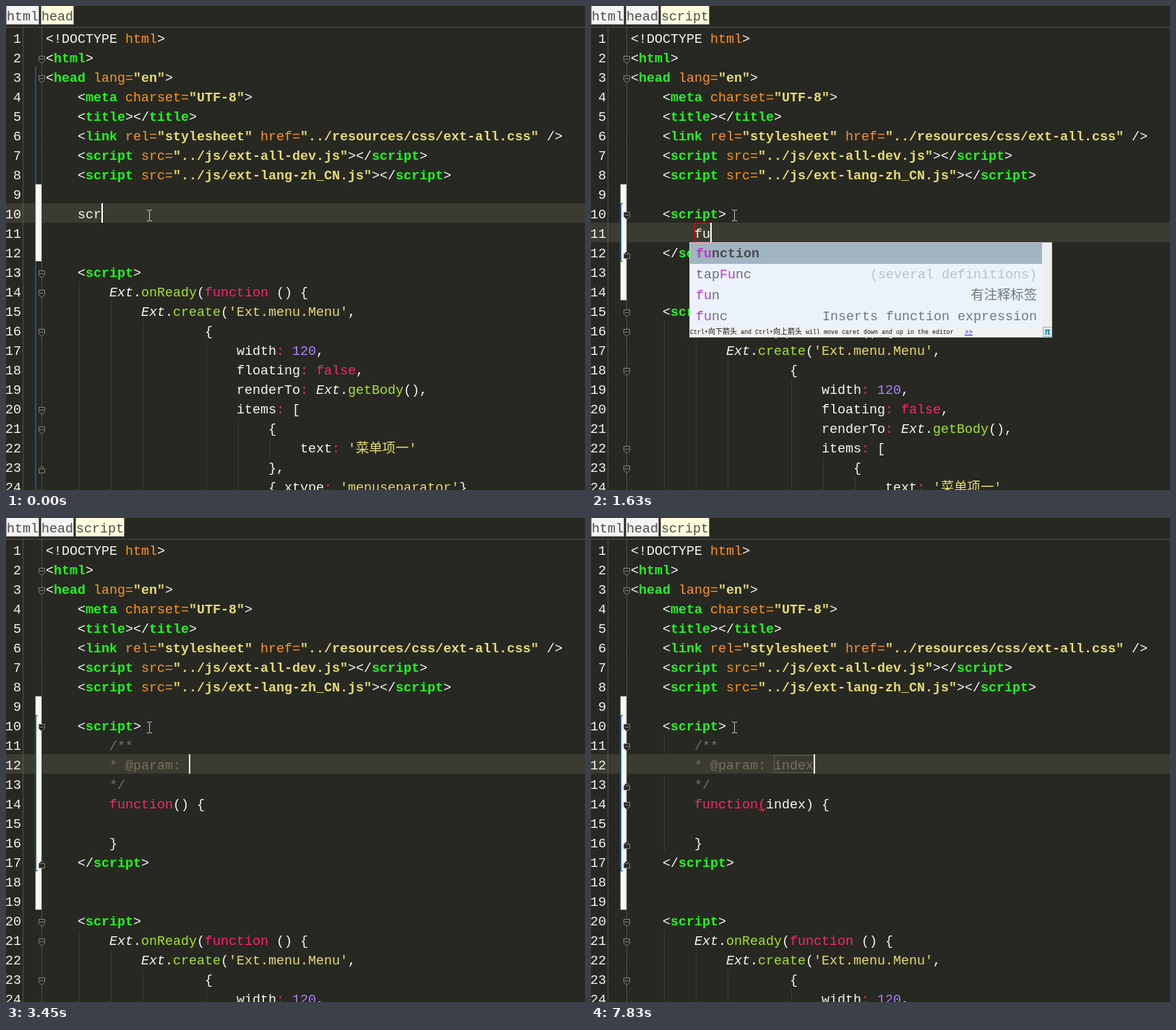
Recreate the animation shown at these times as an HTML page with a canvas. Size 801 by 670 pixels, loop 8000 ms.

```html
<!DOCTYPE html>
<html lang="en">
<head>
<meta charset="UTF-8">
<title>Code editor typing</title>
<style>
  html, body { margin: 0; width: 100%; height: 100%; overflow: hidden; background: #272822; }
  canvas { display: block; }
</style>
</head>
<body>
<canvas id="stage" width="801" height="670"></canvas>
<script>
const ctx = document.getElementById('stage').getContext('2d');
const LOOP = 8000, LEFT = 55, ADVANCE = 11, LINE = 27, TOP = 30, BG = '#272822';
const MONO = '"Liberation Mono", "Noto Sans CJK SC", monospace';
const CODE_FONT = `18.33px ${MONO}`;

// Each run of code starts with one of these style letters.
const STYLES = {
  w: ['#f8f8f2'], g: ['#21f821', 'bold'], o: ['#fd971f'], y: ['#e6db74', 'bold'],
  s: ['#e6db74'], i: ['#f8f8f2', 'italic'], m: ['#a6e22e'], p: ['#f92672'],
  n: ['#ae81ff'], c: ['#75715e']
};

const HEAD = [
  'w<!DOCTYPE |ohtml|w>',
  'w<|ghtml|w>',
  'w<|ghead|o lang=|y"en"|w>',
  'w    <|gmeta|o charset=|y"UTF-8"|w>',
  'w    <|gtitle|w></|gtitle|w>',
  'w    <|glink|o rel=|y"stylesheet"|o href=|y"../resources/css/ext-all.css"|w />',
  'w    <|gscript|o src=|y"../js/ext-all-dev.js"|w></|gscript|w>',
  'w    <|gscript|o src=|y"../js/ext-lang-zh_CN.js"|w></|gscript|w>'
];
const OPEN = 'w    <|gscript|w>', CLOSE = 'w    </|gscript|w>';
const pad = n => 'w' + ' '.repeat(n);
const TAIL = [
  OPEN,
  pad(8) + '|iExt|w.|monReady|w(|pfunction|w () {',
  pad(12) + "|iExt|w.|mcreate|w(|s'Ext.menu.Menu'|w,",
  pad(20) + '{',
  pad(24) + 'width|p:|n 120|w,',
  pad(24) + 'floating|p:|p false|w,',
  pad(24) + 'renderTo|p:|w |iExt|w.|mgetBody|w(),',
  pad(24) + 'items|p:|w [',
  pad(28) + '{',
  pad(32) + "text|p:|s '菜单项一'",
  pad(28) + '},',
  pad(28) + "{ xtype|p:|s 'menuseparator'|w}"
];
const TAIL_FOLDS = [0, 1, 3, 7, 8];
// [column, first tail row, last tail row]
const TAIL_GUIDES = [[4, 1, 12], [8, 2, 12], [12, 3, 12], [20, 4, 12], [24, 8, 12], [28, 9, 9]];

const ITEMS = {
  function: { bold: true },
  tapFunc: { note: '(several definitions)', faint: true },
  fun: { note: '有注释标签' },
  func: { note: 'Inserts function expression' }
};
const CHOICES = {
  fu: ['function', 'tapFunc', 'fun', 'func'],
  fun: ['fun', 'function', 'tapFunc', 'func'],
  func: ['func', 'function', 'tapFunc']
};

// Last value whose start time has been reached.
const at = (t, steps) => steps.reduce((value, [start, next]) => t >= start ? next : value, steps[0][1]);
const lineTop = line => TOP + (line - 1) * LINE;
const colX = col => LEFT + col * ADVANCE;

function rect(x, y, w, h, color) {
  ctx.fillStyle = color;
  ctx.fillRect(x, y, w, h);
}

function outline(x, y, w, h, color) {
  ctx.strokeStyle = color;
  ctx.strokeRect(x + .5, y + .5, w - 1, h - 1);
}

function text(str, x, y, color, font = CODE_FONT, align = 'left') {
  ctx.font = font;
  ctx.fillStyle = color;
  ctx.textAlign = align;
  ctx.fillText(str, x, y);
  return x + ctx.measureText(str).width;
}

function code(line, source) {
  let x = LEFT;
  for (const run of source.split('|')) {
    const [color, face = ''] = STYLES[run[0]];
    x = text(run.slice(1), x, lineTop(line) + 21, color, `${face} ${CODE_FONT}`);
  }
}

function dotted(x1, y1, x2, y2) {
  ctx.strokeStyle = '#777870';
  ctx.setLineDash([1, 1]);
  ctx.beginPath();
  ctx.moveTo(x1, y1);
  ctx.lineTo(x2, y2);
  ctx.stroke();
  ctx.setLineDash([]);
}

function guide(col, first, last) {
  rect(colX(col) + 2, lineTop(first), 1, (last - first + 1) * LINE, '#3b3c35');
}

function fold(line, dir = 1) {
  const y = lineTop(line) + 17.5;
  ctx.beginPath();
  [[-4, -5], [4, -5], [4, 1], [0, 5], [-4, 1]].forEach(([dx, dy]) => ctx.lineTo(49.5 + dx, y + dy * dir));
  ctx.closePath();
  ctx.fillStyle = BG;
  ctx.fill();
  ctx.strokeStyle = '#85867c';
  ctx.stroke();
  rect(47, y - 1.5, 5, 1, '#85867c');
}

function breadcrumbs(names) {
  let x = 0;
  names.forEach((name, i) => {
    const w = name.length * ADVANCE + 2;
    rect(x, 0, w, 26, i === names.length - 1 ? '#ffffe0' : '#f4f4f4');
    outline(x, -1, w, 27, '#8c8c84');
    text(name, x + 1, 20, '#4c4d45');
    x += w + 2;
  });
}

function changeStrip(first, last) {
  const y = lineTop(first), h = (last - first + 1) * LINE;
  rect(40, y, 10, h, '#f2fff0');
  outline(40, y, 10, h, '#55564e');
}

function scopeBar(first, last) {
  const y = lineTop(first), h = (last - first + 1) * LINE;
  rect(40, y, 2, h, '#24507e');
  rect(40, y, 4, 1, '#24507e');
  rect(40, y + h - 1, 4, 1, '#24507e');
}

function pointer() {
  rect(198, 283, 1, 14, '#c8c8c0');
  for (const y of [282, 297]) {
    rect(195, y, 3, 1, '#c8c8c0');
    rect(199, y, 3, 1, '#c8c8c0');
  }
}

function popup(prefix) {
  const names = CHOICES[prefix], x = 136, y = 327, bottom = y + 1 + names.length * 29;
  rect(x, y, 502, bottom - y + 15, '#ebf2fc');
  rect(624, y, 14, bottom - y, '#eeeeee');
  rect(x, bottom, 502, 15, '#f1f1f1');
  rect(x, y + 1, 488, 29, '#a0b4c1');
  names.forEach((name, row) => {
    const { bold, note, faint } = ITEMS[name], base = y + 21 + row * 29;
    const start = name.toLowerCase().indexOf(prefix), end = start + prefix.length;
    const font = bold ? `bold ${CODE_FONT}` : CODE_FONT, gray = bold ? '#484c50' : '#6c7076';
    let pen = text(name.slice(0, start), 145, base, gray, font);
    pen = text(name.slice(start, end), pen, base, '#b93cc0', font);
    text(name.slice(end), pen, base, gray, font);
    if (note) text(note, 617, base, faint ? '#bcc1c9' : '#73787f', CODE_FONT, 'right');
  });
  let pen = 137;
  for (const part of 'Ctrl+|向下箭头| and Ctrl+|向上箭头| will move caret down and up in the editor'.split('|')) {
    pen = text(part, pen, bottom + 10, '#111', `${part[0] > '~' ? 10 : 8.33}px ${MONO}`);
  }
  text('>>', 517, bottom + 10, '#1818e0', `9px ${MONO}`);
  rect(517, bottom + 11, 11, 1, '#1818e0');
  rect(625, bottom, 13, 14, '#d8e8f2');
  outline(625, bottom, 13, 14, '#9ab8c8');
  text('π', 631.5, bottom + 11, '#1878a8', `bold 13px ${MONO}`, 'center');
  outline(x, y, 502, bottom - y + 15, '#c3c9cf');
}

function squiggle(x, y) {
  ctx.strokeStyle = '#f03030';
  ctx.beginPath();
  for (let i = 0; i <= 5; i++) ctx.lineTo(x + i * 2, y + (i % 2 ? 3 : 0));
  ctx.stroke();
}

function draw(t) {
  const inTag = t < 550, documented = t >= 3450, scoped = t >= 830, parsed = t >= 3730;
  const tail = inTag ? 13 : documented ? 20 : 15;
  const close = documented ? 17 : 12;
  const tag = at(t, [[0, 'scr'], [120, 'scri']]);
  const word = at(t, [[0, ''], [1510, 'f'], [1630, 'fu'], [1900, 'fun'], [2150, 'func'], [3170, 'fun']]);
  const param = at(t, [[0, ''], [6850, 'i'], [7120, 'in'], [7400, 'ind'], [7520, 'inde'], [7830, 'index']]);
  const argument = t < 6970 ? '' : param;
  const caretLine = inTag ? 10 : documented ? 12 : 11;
  const caretCol = inTag ? 4 + tag.length : documented ? 18 + param.length : 8 + word.length;
  const caretOn = at(t, [[0, true], [4870, false], [5330, true], [5770, false], [6320, true]]);

  rect(0, 0, 801, 670, BG);
  rect(0, lineTop(caretLine), 801, LINE, '#3c3b32');
  breadcrumbs(scoped ? ['html', 'head', 'script'] : ['html', 'head']);
  dotted(0, 29.5, 801, 29.5);
  dotted(23.5, 30, 23.5, 670);
  dotted(49.5, 30, 49.5, 670);

  if (!scoped) scopeBar(3, 25);
  changeStrip(9, tail - 1);
  if (scoped) scopeBar(10, close);

  for (const [col, first, last] of TAIL_GUIDES) guide(col, tail + first, tail + last);
  if (parsed) {
    guide(4, 11, 11);
    guide(4, 13, 16);
  }

  [2, 3].forEach(line => fold(line));
  TAIL_FOLDS.forEach(row => fold(tail + row));
  fold(tail + 10, -1);
  if (scoped) {
    fold(10);
    fold(close, -1);
  }
  if (parsed) {
    fold(11);
    fold(13, -1);
    fold(14);
    fold(16, -1);
  }

  for (let line = 1; line <= 24; line++) {
    text(line, 21, lineTop(line) + 21, '#f4f4ee', CODE_FONT, 'right');
  }
  HEAD.forEach((source, i) => code(i + 1, source));
  TAIL.forEach((source, i) => code(tail + i, source));

  if (inTag) {
    code(10, pad(4) + tag);
  } else {
    code(10, OPEN);
    code(close, CLOSE);
  }
  if (documented) {
    code(11, 'c        /**');
    code(12, 'c        * @param: ' + param);
    code(13, 'c        */');
    code(14, `p        function|${parsed ? 'p' : 'w'}(|w${argument}) {`);
    code(16, pad(8) + '}');
    if (parsed) squiggle(232, lineTop(14) + 21.5);
    if (param) outline(253, lineTop(12) + 1, param.length * ADVANCE + 1, 25, '#5b5a4e');
  } else if (!inTag) {
    code(11, pad(8) + word);
    if (word) outline(143, lineTop(11), word.length * ADVANCE + 2, LINE, '#ff0000');
  }
  if (caretOn) rect(colX(caretCol), lineTop(caretLine), 2, LINE, '#ffffff');
  if (!documented && CHOICES[word]) popup(word);
  pointer();
}

ctx.lineWidth = 1;
const start = performance.now();
function frame() {
  draw((performance.now() - start) % LOOP);
  requestAnimationFrame(frame);
}
frame();
</script>
</body>
</html>
```
